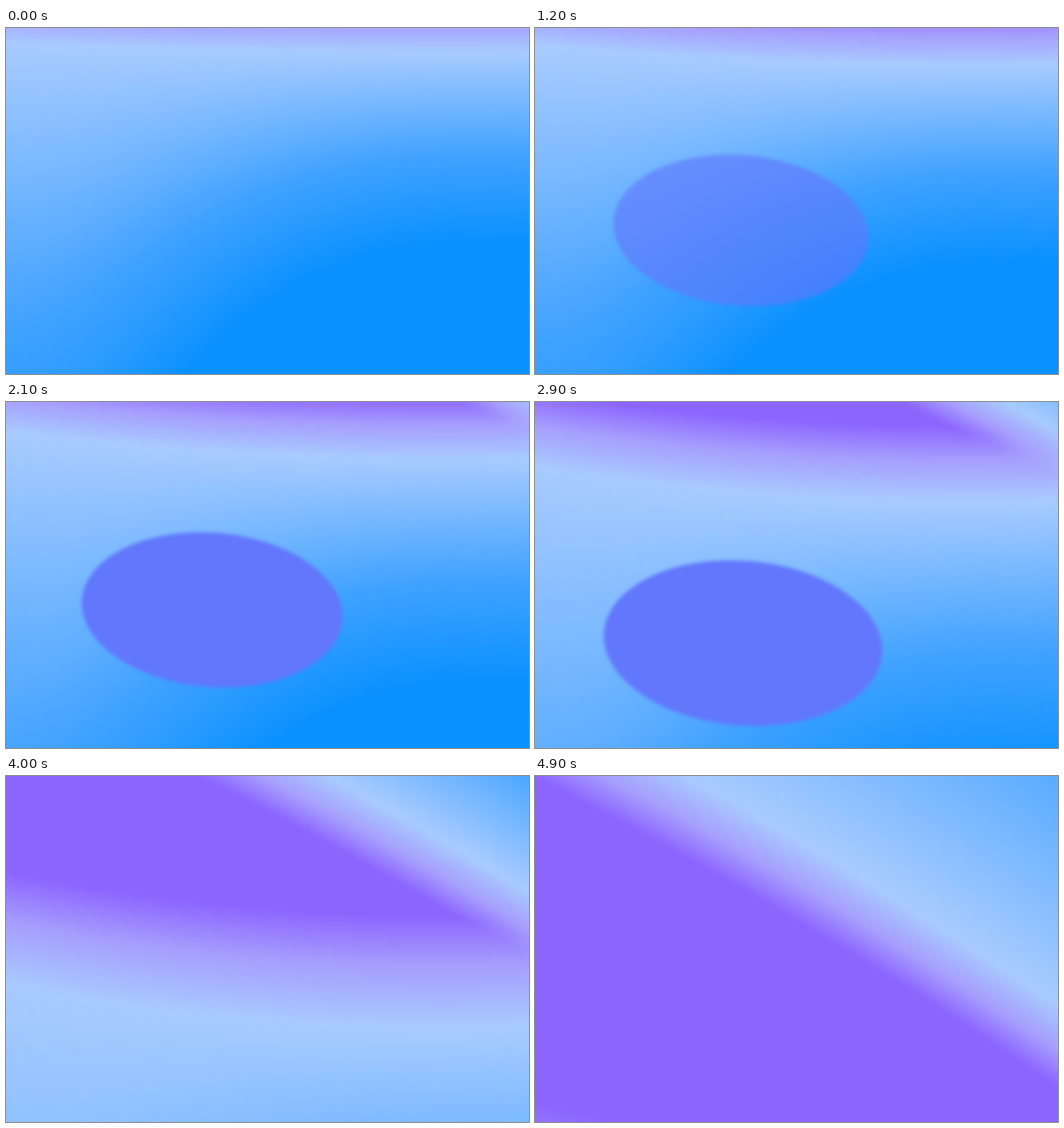
Write an HTML page with a canvas that moves like this. It is 600 by 397 pixels and loops after 5000 ms.

```html
<!DOCTYPE html>
<html lang="en">
<head>
<meta charset="utf-8">
<title>Violet drift</title>
<style>
  html, body { margin: 0; width: 100%; height: 100%; overflow: hidden; background: #1090ff; }
  canvas { display: block; width: 100vw; height: 100vh; }
</style>
</head>
<body>
<canvas id="stage" width="600" height="397"></canvas>
<script>
const W = 600, H = 397, LOOP = 5000, STEP = 100;
const ctx = document.getElementById('stage').getContext('2d');
ctx.imageSmoothingQuality = 'high';

// The light field is smooth, so it is shaded small and scaled up.
const field = document.createElement('canvas');
field.width = 150;
field.height = 100;
const fctx = field.getContext('2d');
const img = fctx.createImageData(field.width, field.height);

const clamp = v => Math.min(1, Math.max(0, v));
const smooth = v => (v = clamp(v), v * v * (3 - 2 * v));
const stretch = (u, k) => u > 1 ? 1 + (u - 1) * k : Math.max(0, u);

// Colour ramp by distance from the violet core, read back from a gradient strip
const REACH = 8, RAMP = 800;
const strip = document.createElement('canvas');
strip.width = RAMP;
strip.height = 1;
const sctx = strip.getContext('2d');
const ramp = sctx.createLinearGradient(0, 0, RAMP, 0);
const colours = { 0: '#8c64ff', .45: '#a69efd', 1: '#a8cbff', 2: '#8cc0ff', 4.8: '#40a2ff', 8: '#0890ff' };
for (const at in colours) ramp.addColorStop(at / REACH, colours[at]);
sctx.fillStyle = ramp;
sctx.fillRect(0, 0, RAMP, 1);
const palette = sctx.getImageData(0, 0, RAMP, 1).data;

// The violet core lies between a low edge and a diagonal upper edge; p runs 0 to 1.
function drawField(p) {
  const lowY = 417 * p ** 5 - 42, lowSoft = 60 + 130 * p ** 3, bend = .2 + p;
  const upX = 600 - 605 * p ** 2.3, upSoft = 45 + 50 * p * p, upGain = 2.5 - 1.45 * p ** 5;
  let o = 0;
  for (let j = 0; j < field.height; j++) {
    const y = (j + .5) * H / field.height;
    for (let i = 0; i < field.width; i++) {
      const x = (i + .5) * W / field.width, dx = x - upX;
      const low = lowY + bend * (.2 * x - .0002 * x * x);
      const up = .5 * dx + .00015 * dx * Math.abs(dx);
      const below = stretch((y - low) / lowSoft, .7 + 1.2 * smooth(x / 520));
      const above = stretch((up - y) / upSoft, upGain);
      const u = clamp(Math.hypot(below, above) / REACH);
      const c = 4 * Math.round(u * (RAMP - 1));
      for (let n = 0; n < 4; n++) img.data[o++] = palette[c + n];
    }
  }
  fctx.putImageData(img, 0, 0);
  ctx.drawImage(field, 0, 0, W, H);
}

// A plain disc surfaces, then slides out below as the view closes in.
function drawDisc(p, t) {
  const r = 146 + 115 * p ** 4;
  ctx.save();
  ctx.globalAlpha = smooth(t / 2000);
  ctx.filter = 'blur(2px)';
  ctx.fillStyle = '#6277fc';
  ctx.beginPath();
  ctx.ellipse(236 + 60 * p ** 6, 232 + 1040 * p ** 6, r, r * .59, .08, 0, 2 * Math.PI);
  ctx.fill();
  ctx.restore();
}

let shown = -1;
const start = performance.now();
function tick() {
  const t = Math.floor((performance.now() - start) % LOOP / STEP) * STEP;
  if (t !== shown) {
    shown = t;
    const p = t / (LOOP - STEP);
    drawField(p);
    drawDisc(p, t);
  }
  requestAnimationFrame(tick);
}
tick();
</script>
</body>
</html>
```
